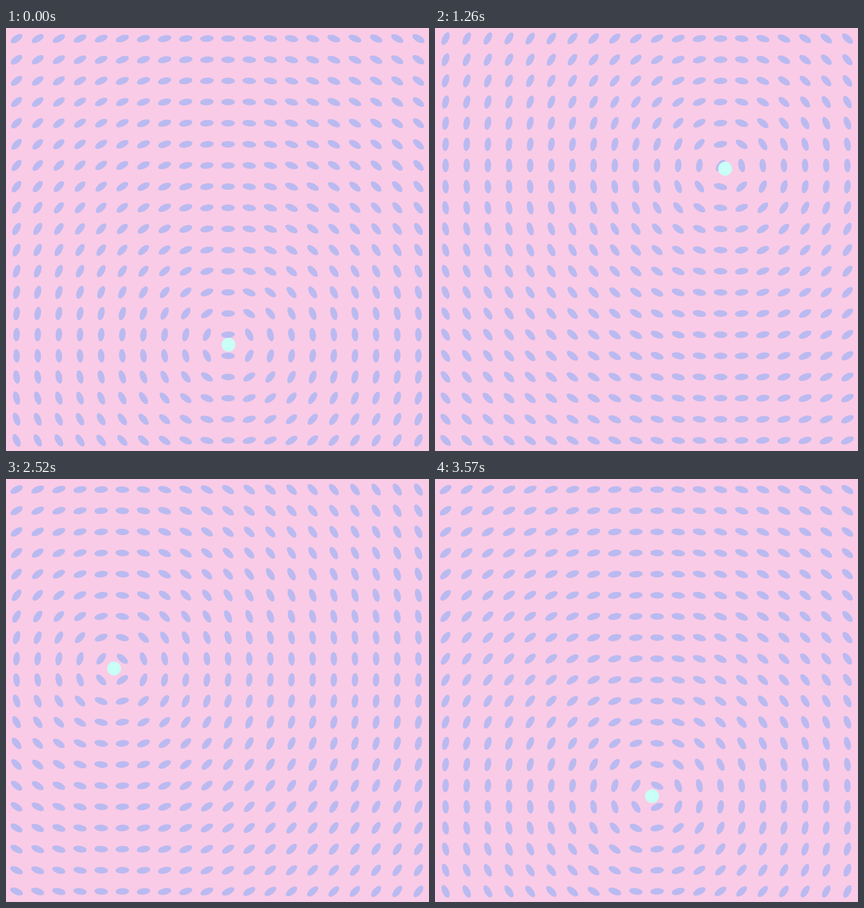
An HTML page with a canvas for the animation above (3.6 s loop, 748 by 748 pixels).

```html
<!DOCTYPE html>
<html lang="en">
<head>
<meta charset="utf-8">
<title>Compass field</title>
<style>
  html, body { margin: 0; width: 100%; height: 100%; overflow: hidden; background: #facbe6; }
  canvas { display: block; }
</style>
</head>
<body>
<canvas id="stage" width="748" height="748"></canvas>
<script>
const SIZE = 748, CELLS = 20, CELL = SIZE / CELLS;
const STEP_MS = 30, STEPS = 120;
const ctx = document.getElementById('stage').getContext('2d');

function fillEllipse(x, y, rx, ry, angle) {
  ctx.beginPath();
  ctx.ellipse(x, y, rx, ry, angle, 0, 2 * Math.PI);
  ctx.fill();
}

function draw(time) {
  // The dot orbits the centre in even steps, starting near the bottom.
  const step = Math.floor(time / STEP_MS + 0.01) % STEPS;
  const orbit = (step + 2) / STEPS * 2 * Math.PI;
  const dotX = SIZE / 2 + SIZE / 4 * Math.sin(orbit);
  const dotY = SIZE / 2 + SIZE / 4 * Math.cos(orbit);

  ctx.fillStyle = '#facbe6';
  ctx.fillRect(0, 0, SIZE, SIZE);

  // Each needle lies at a right angle to its line of sight to the dot.
  ctx.fillStyle = '#babaf1';
  for (let row = 0; row < CELLS; row++) {
    for (let col = 0; col < CELLS; col++) {
      const x = (col + 0.5) * CELL, y = (row + 0.5) * CELL;
      fillEllipse(x, y, 12, 5.8, Math.atan2(dotY - y, dotX - x) + Math.PI / 2);
    }
  }

  ctx.fillStyle = '#c8fff7';
  fillEllipse(dotX, dotY, 12.3, 12.3, 0);
}

function tick(now) {
  draw(now);
  requestAnimationFrame(tick);
}
draw(0);
requestAnimationFrame(tick);
</script>
</body>
</html>
```
